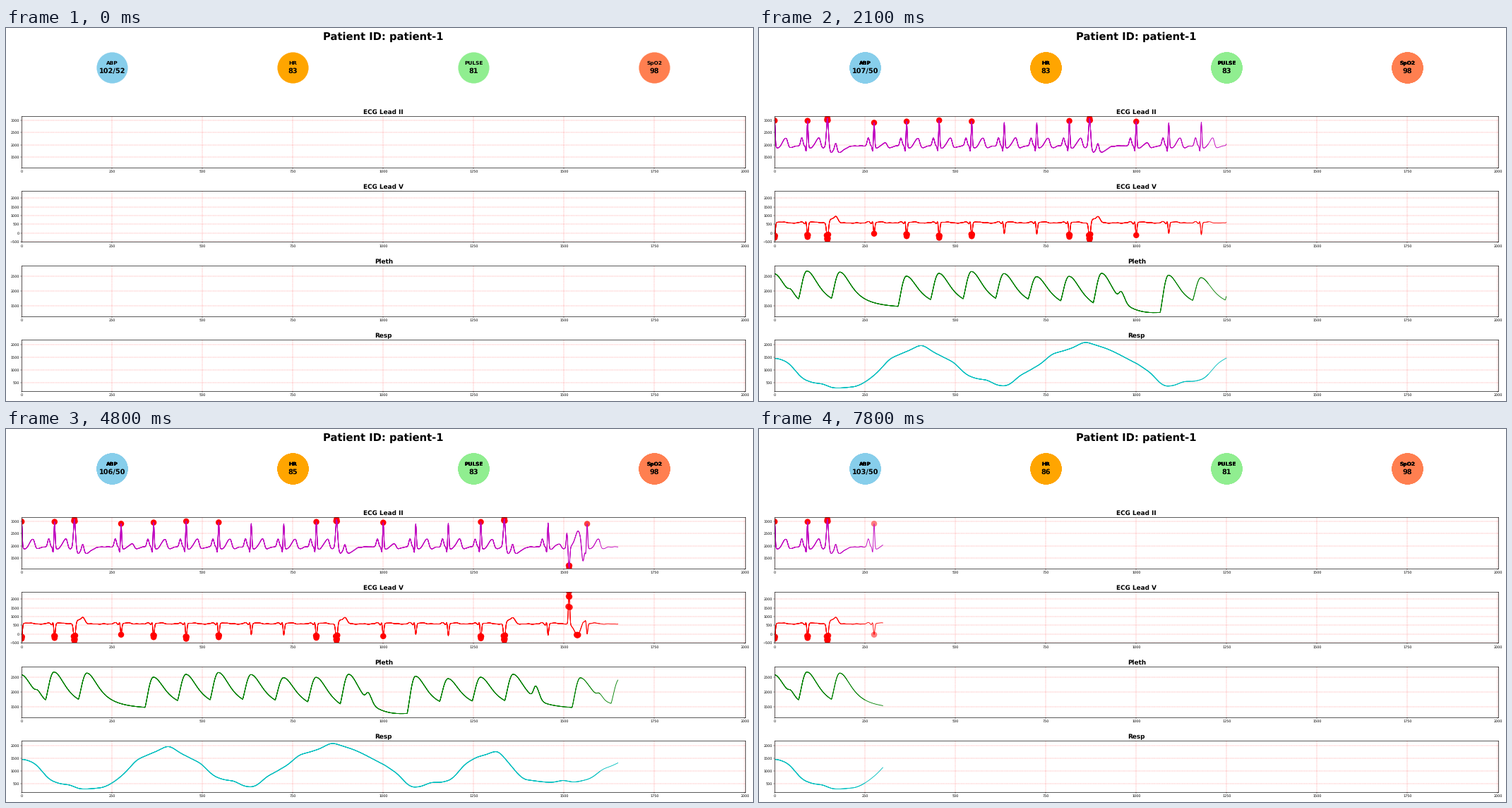
Write a matplotlib script that moves like this. It is 1058 px wide and 529 px high and loops after 8 s.

```python
import numpy as np
import matplotlib.pyplot as plt
from matplotlib.animation import FuncAnimation

plt.rcParams["font.family"] = "DejaVu Sans"
plt.rcParams["text.hinting"] = "none"

W, H = 1058, 529
STEP = 50                      # samples added per update
PASSES = 5                     # overdrawn copies that thicken older parts
N = np.arange(2001)

# first R peak, number of beats, spacing
RUNS = [(0, 2, 91), (275, 7, 90), (1000, 4, 90), (1456, 2, 108), (1677, 4, 92)]
BEATS = [r + i * gap for r, count, gap in RUNS for i in range(count)]
ECTOPIC = [146, 871, 1335]
ARTIFACT = 1514
CALM = [635, 725, 1090, 1180, 1456]        # beats that raise no alarm

# waves as (offset, width, height)
ST_DIP = [(8, 6, -90), (42, 8, -80)]
BEAT_V = [(-17, 4, 75), (-8, 2, -60), (-4, 1.5, 140), (18, 10, 60)]
ECTOPIC_II = [(0, 2.8, 1170), (10, 4, -190), (23, 3, 310), (32, 14, -260)]
ECTOPIC_V = [(0, 2.5, -980), (10, 5, 180), (23, 6, 370)]
ARTIFACT_II = [(-6, 1.8, 600), (0, 2, -850), (25, 8, 650), (37, 4, -900)]
ARTIFACT_V = [(0, 1.8, 1880), (23, 9, -640), (41, 4, 250)]

# slow breathing wave under the heartbeat ripple
BREATHS = [(0, 1440), (88, 575), (160, 270), (215, 320), (361, 1690),
           (402, 1850), (452, 1595), (543, 720), (633, 360), (721, 1100),
           (812, 1800), (868, 1980), (997, 1270), (1087, 350), (1178, 600),
           (1267, 1560), (1311, 1650), (1398, 640), (1505, 510), (1561, 640),
           (1674, 1450), (1713, 1560), (1780, 850), (1850, 280), (1906, 330),
           (2000, 900)]


def bump(mid, left, amp, right=None):
    t = N - mid
    width = np.where(t < 0, left, right or left)
    return amp * np.exp(-0.5 * (t / width) ** 2)


def waves(at, parts):
    return sum(bump(at + dt, width, amp) for dt, width, amp in parts)


def breath(n):
    return np.cos(2 * np.pi * (n - 25) / 430)


def curve(pts):
    """Monotone cubic through the knots, sampled at every N."""
    x, y = np.array(pts, float).T
    d = np.diff(y) / np.diff(x)
    p = d[1:] * d[:-1]
    m = np.zeros_like(y)
    m[1:-1] = np.where(p > 0, 2 * p / np.where(p > 0, d[1:] + d[:-1], 1), 0)
    i = np.clip(np.searchsorted(x, N, "right") - 1, 0, len(x) - 2)
    h = x[i + 1] - x[i]
    s = (N - x[i]) / h
    a, b = (1 + 2 * s) * (1 - s) ** 2, s * (1 - s) ** 2
    c, e = s * s * (3 - 2 * s), s * s * (s - 1)
    return a * y[i] + b * h * m[i] + c * y[i + 1] + e * h * m[i + 1]


def ecg():
    two = 1960 + 12 * np.sin(N / 3.1) * np.sin(N / 17)
    five = 575 + 18 * np.sin(N / 3.7) * np.sin(N / 13)
    for last, r in zip([-90] + BEATS, BEATS):
        t_wave = 150 if r - last > 150 else 350
        two += bump(r - 16, 3, 325) + bump(r - 4, 1.4, -240)
        two += bump(r, 1.6, 1025 + 45 * breath(r)) + waves(r, ST_DIP)
        two += bump(r + 32, 8, t_wave, 4)
        five += bump(r, 1.9, -740 - 135 * breath(r)) + waves(r, BEAT_V)
    for r in ECTOPIC:
        two += waves(r, ECTOPIC_II)
        five += waves(r, ECTOPIC_V)
    return two + waves(ARTIFACT, ARTIFACT_II), five + waves(ARTIFACT, ARTIFACT_V)


def pleth():
    """Each beat lifts the pulse 89 samples later, then it decays."""
    sig = np.zeros(len(N))
    floor = 1390 - bump(1010, 120, 280, 80)
    for r in [-91] + BEATS:
        peak, top = r + 89, 2600 - 0.05 * r + 90 * breath(r)
        u = (N - peak + 23) / 23
        rise = (u >= 0) & (u < 1)
        if rise.any():
            s = u[rise] ** 0.7
            foot = sig[rise][0]
            sig[rise] = foot + (top - foot) * s * s * (3 - 2 * s)
        fall = N >= peak
        decay = floor + (top - floor) / (1 + ((N - peak) / 42) ** 2)
        sig[fall] = decay[fall]
        if peak < 0:
            sig[:] = decay
    for mid, amp in [(45, 130), (959, 300), (1422, 440), (1598, 140)]:
        sig += bump(mid, 6, amp, 9)
    return sig


def alarms(sig, low, high):
    hit = (sig < low) | (sig > high)
    for r in CALM:
        hit[r - 6:r + 7] = False
    return np.column_stack([N[hit], sig[hit]])


lead2, lead5 = ecg()
resp = curve(BREATHS) + sum(bump(r + 42, 16, 100) for r in BEATS)

# title, colour, data, alarm marks, y range, y ticks
PANELS = [
    ("ECG Lead II", "m", lead2, alarms(lead2, 1250, 2850), (1086, 3163), (1500, 3001)),
    ("ECG Lead V", "r", lead5, alarms(lead5, -40, 1400), (-520, 2430), (-500, 2001)),
    ("Pleth", "g", pleth(), None, (1123, 2879), (1500, 2501)),
    ("Resp", "c", resp, None, (159, 2175), (500, 2001)),
]
BADGES = [("ABP", "skyblue"), ("HR", "orange"),
          ("PULSE", "lightgreen"), ("SpO2", "coral")]
# one set of readings per 250 samples
VITALS = [("102/52", 83, 81, 98)] * 2 + [("103/50", 86, 81, 98)]
VITALS += [("107/50", 83, 83, 98)] * 3
VITALS += [("104/50", 82, 83, 98), ("106/50", 85, 83, 98), ("107/51", 85, 83, 98)]
COUNTS = [0, *range(950, 1501, STEP), *range(1500, 2001, STEP),
          *range(200, 301, STEP)]

fig = plt.figure(figsize=(30, 15), dpi=35.26667, facecolor="white")
top_ax = fig.add_axes([0, 0, 1, 1])
top_ax.set(xlim=(0, W), ylim=(H, 0))
top_ax.axis("off")
top_ax.text(534.7, 17.2, "Patient ID: patient-1", size=30, weight="bold",
            ha="center")

values, overdrawn = [], []
for i, (name, color) in enumerate(BADGES):
    x = 150.2 + 256 * i
    for j in range(PASSES):
        dot = top_ax.scatter([x], [56], s=8000, color=color, linewidths=0.5, zorder=1)
        label = top_ax.text(x, 51.7, name, size=15, weight="bold", ha="center")
        if j:
            overdrawn += [dot, label]
    values.append(top_ax.text(x, 63.6, "", size=20, weight="bold", ha="center"))

traces = []
for i, (title, color, data, marks, ylim, ticks) in enumerate(PANELS):
    y = 125.2 + 105.7 * i
    ax = fig.add_axes([22.2 / W, 1 - (y + 72.5) / H, 1025.2 / W, 72.5 / H])
    ax.set(xlim=(0, 2002), ylim=ylim, xticks=range(0, 2001, 250),
           yticks=range(*ticks, 500))
    ax.set_title(title, size=18, weight="bold")
    ax.grid(color="r", ls="--", lw=0.9, alpha=0.5)
    for spine in ax.spines.values():
        spine.set_linewidth(1.3)
    lines = [ax.plot([], [], color=color, lw=1.8)[0] for _ in range(PASSES)]
    dots = None
    if marks is not None:
        dots = ax.scatter(*marks.T, s=300, edgecolors="none", zorder=1)
    traces.append((lines, data, dots, marks))


def update(i):
    k = i // 3
    count = COUNTS[k]
    for text, value in zip(values, VITALS[-(-count // 250)]):
        text.set_text(value)
    for art in overdrawn:
        art.set_visible(k > 0)
    for lines, data, dots, marks in traces:
        for j, line in enumerate(lines):
            n = max(count - j * STEP, 0)
            line.set_data(N[:n], data[:n])
        if dots is not None:
            draws = np.maximum((count - marks[:, 0] - 1) // STEP + 1, 0)
            rgba = np.tile([1.0, 0, 0, 0], (len(marks), 1))
            rgba[:, 3] = 1 - 0.5 ** draws
            dots.set_facecolor(rgba)
    return []


anim = FuncAnimation(fig, update, frames=80, interval=100, repeat=True,
                     repeat_delay=0, init_func=lambda: update(0))
plt.show()
```
